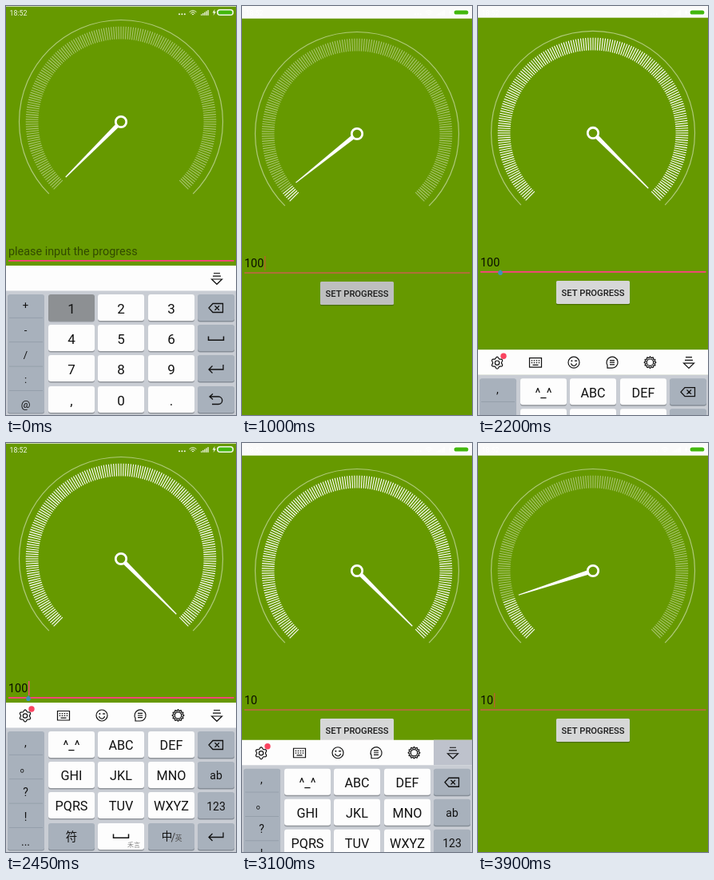
Animation of 288 by 512 pixels, one loop 4100 ms. Source, as an HTML page with a canvas:

```html
<!DOCTYPE html>
<html lang="en">
<head>
<meta charset="utf-8">
<title>Gauge</title>
<style>
html, body { margin: 0; width: 100%; height: 100%; overflow: hidden; background: #690; }
canvas { display: block; width: 288px; height: 512px; }
</style>
</head>
<body>
<canvas id="stage"></canvas>
<script>
const W = 288, H = 512, LOOP = 4100, STEP = 50, PAN = 15, KEYS_H = 187;
const TAU = Math.PI * 2;
const SANS = 'Roboto, "Noto Sans CJK SC", "Noto Sans CJK", sans-serif';
const COLS = [53, 115, 178], ROWS = [361, 399, 437, 476];
const INK = '#111';

const canvas = document.getElementById('stage');
const dpr = window.devicePixelRatio || 1;
canvas.width = W * dpr;
canvas.height = H * dpr;
const c = canvas.getContext('2d');

const clamp = v => Math.max(0, Math.min(1, v));
const ramp = (t, start, dur) => clamp((t - start) / dur);
const easeIn = u => u * u;
const easeOut = u => 1 - (1 - u) * (1 - u);
const easeBoth = u => (1 - Math.cos(Math.PI * u)) / 2;
const within = (t, a, b) => t >= a && t < b;

function rect(x, y, w, h, color) {
  c.fillStyle = color;
  c.fillRect(x, y, w, h);
}

function round(x, y, w, h, r, color) {
  c.fillStyle = color;
  c.beginPath();
  c.roundRect(x, y, w, h, r);
  c.fill();
}

function disc(x, y, r, color) {
  c.fillStyle = color;
  c.beginPath();
  c.arc(x, y, r, 0, TAU);
  c.fill();
}

function ring(x, y, r, width, color, from = 0, to = TAU) {
  c.strokeStyle = color;
  c.lineWidth = width;
  c.beginPath();
  c.arc(x, y, r, from, to);
  c.stroke();
}

function trace(d, x, y, width = 1.3, color = INK) {
  c.save();
  c.translate(x, y);
  c.strokeStyle = color;
  c.lineWidth = width;
  c.stroke(new Path2D(d));
  c.restore();
}

function write(s, x, base, size, color, align = 'left', weight = 400) {
  c.font = `${weight} ${size}px ${SANS}`;
  c.textAlign = align;
  c.fillStyle = color;
  c.fillText(s, x, base);
}

const label = (s, x, y, size, color = INK) =>
  write(s, x, y + size * 0.36, size, color, 'center');

// ---- time-dependent state ----

function panAt(t) {
  if (t < 1000) return -PAN * (1 - easeOut(ramp(t, 400, 200)));
  if (t < 2800) return -PAN * easeOut(ramp(t, 2193, 200));
  return -PAN * (1 - easeOut(ramp(t, 2890, 200)));
}

function keysOffset(t) {
  if (t < 1000) return KEYS_H * easeIn(ramp(t, 550, 200));
  if (t < 2800) return KEYS_H * (1 - easeOut(ramp(t, 2150, 200)));
  return KEYS_H * easeIn(ramp(t, 3000, 200));
}

const progressAt = t =>
  easeBoth(ramp(t, 941, 600)) - 0.9 * easeBoth(ramp(t, 3279, 600));

function textAt(t) {
  if (t < 100) return '';
  if (t < 200) return '1';
  if (t < 300) return '10';
  return t < 2650 ? '100' : '10';
}

const cursorAt = t => within(t, 100, 1200) || within(t, 1700, 2200) ||
  within(t, 2350, 2750) || t >= 3700;

function pressedKey(t) {
  if (t < 100) return '1';
  if (within(t, 150, 200) || within(t, 250, 300)) return '0';
  if (within(t, 2550, 2650)) return 'back';
  return '';
}

// ---- gauge and form ----

function drawGauge(p) {
  const x = 144, y = 160, start = Math.PI * 0.75, sweep = Math.PI * 1.5, n = 180;
  ring(x, y, 127.5, 1.2, 'rgba(255,255,255,.48)', start, start + sweep);
  c.save();
  c.translate(x, y);
  for (let i = 0; i <= n; i++) {
    c.save();
    c.rotate(start + sweep * i / n);
    const lit = p > 0 && i / n <= p;
    rect(103.5, -0.55, 15.8, 1.1, lit ? '#fff' : 'rgba(255,255,255,.43)');
    c.restore();
  }
  c.rotate(start + sweep * p);
  c.fillStyle = '#fff';
  c.beginPath();
  c.moveTo(7, -2.7);
  c.lineTo(98, -0.6);
  c.lineTo(98, 0.6);
  c.lineTo(7, 2.7);
  c.fill();
  c.restore();
  ring(x, y, 6.7, 2.8, '#fff');
}

function drawForm(t, pan) {
  const s = textAt(t), pink = pan < 0;
  write(s || 'please input the progress', 3, 327, 14.4, s ? '#0a0f00' : 'rgba(0,0,0,.52)');
  const end = 4.3 + c.measureText(s).width;
  if (s && cursorAt(t)) rect(end - 0.5, 313, 1.4, 18, pink ? '#ff4081' : '#b8602c');
  if (pink) rect(3, 333, 282.5, 1.8, '#ff4081');
  else rect(3, 333.3, 282.5, 1.5, '#c9624a');
  if (within(t, 2200, 2550)) {
    disc(28, 335.2, 2.8, '#3c93b8');
    c.beginPath();
    c.moveTo(28, 331);
    c.lineTo(30.5, 334);
    c.lineTo(25.5, 334);
    c.fill();
  }

  const since = t - (t < 2000 ? 900 : 3250);
  const dark = since >= 0 ? 0.14 * (1 - ramp(since, 0, 500)) : 0;
  round(98, 346, 92, 29.3, 1.6, 'rgba(0,0,0,.28)');
  round(98, 345, 92, 29, 1.6, '#d6d7d7');
  if (dark) round(98, 345, 92, 29, 1.6, `rgba(0,0,0,${dark})`);
  write('SET PROGRESS', 144, 363.6, 11.2, '#1c1c1c', 'center', 500);
}

function drawStatus() {
  const white = 'rgba(255,255,255,.92)';
  write('18:52', 4.5, 11.6, 8.8, white);
  for (let i = 0; i < 3; i++) disc(217 + i * 3.4, 10.3, 1, white);
  for (let i = 0; i < 3; i++) {
    ring(234, 12, 1.6 + i * 2.3, 1, white, Math.PI * 1.25, Math.PI * 1.75);
  }
  for (let i = 0; i < 5; i++) rect(244 + i * 2.1, 10.3 - i * 1.3, 1.3, 1.5 + i * 1.3, white);
  c.fillStyle = white;
  c.fill(new Path2D('M261.5 4L258.5 8.6H260.5L259.5 12L263 7.3H261Z'));
  round(264, 4, 21, 8, 4, white);
  round(265.6, 5.4, 17.8, 5.2, 2.6, '#43b80e');
}

// ---- keyboard ----

function key(x, y, w, tone, down) {
  const face = { light: '#fdfdfd', dark: '#a8b1bc' }[tone];
  round(x, y + 1, w, 33.5, 3, tone === 'light' ? '#92969c' : '#858d97');
  round(x, y, w, 33, 3, down ? '#8d9093' : face);
}

const backspace = (x, y) =>
  trace('M-9 0L-4 -5.5H8.5V5.5H-4ZM-1.5 -2.7L4 2.7M4 -2.7L-1.5 2.7', x, y);
const space = (x, y) => trace('M-9.5 -3V1.7H9.5V-3', x, y, 1.5);
const enter = (x, y) => trace('M9 -5V1H-9M-4.5 -3.5L-9 1L-4.5 5.5', x, y);
const undo = (x, y) =>
  trace('M-4 -7.5L-8 -4L-4 -0.5M-8 -4H3A4.7 4.7 0 0 1 3 5.5H-5', x, y);

function gear(x, y, teeth, r, bump, hole) {
  c.strokeStyle = INK;
  c.lineWidth = 1.2;
  c.beginPath();
  for (let i = 0; i <= 96; i++) {
    const a = TAU * i / 96, d = r + bump * Math.cos(a * teeth);
    c.lineTo(x + d * Math.sin(a), y + d * Math.cos(a));
  }
  c.stroke();
  ring(x, y, hole, 1.2, INK);
}

function drawToolbar(full, held) {
  rect(0, 325, W, 31.5, '#fdfdfd');
  if (held) rect(240, 325, 48, 31.5, '#bec2cc');
  trace('M-4 -7H4M-5 -3.3H5M-6.5 0.5H6.5L0 6.8Z', 264, 341.5, 1.2);
  if (!full) return;
  gear(24, 341.5, 6, 6.4, 1, 2.7);
  disc(32, 333, 3.7, '#fa4460');
  trace('M-7.5 -5.5H7.5V6H-7.5ZM-3.5 3.2H3.5', 72, 341, 1.2);
  for (let i = 0; i < 8; i++) rect(66.7 + (i % 4) * 3, 338 + (i >> 2) * 2.7, 1.5, 1.3, INK);
  ring(120, 341, 7, 1.2, INK);
  ring(120, 341.5, 3.6, 1.2, INK, 0.2, Math.PI - 0.2);
  disc(117.4, 339, 1, INK);
  trace('M1 -1.5H4.2', 120, 340.5);
  trace('M-6 7H0A7 7 0 1 0 -6 3.5ZM-3 -2.6H3M-3 0H3M-3 2.6H3', 168, 341, 1.2);
  gear(215.5, 341, 12, 6.5, 0.8, 4.2);
}

function drawSide(marks, sizes) {
  round(2, 362, 46, 148.5, 3, '#858d97');
  round(2, 361, 46, 148.5, 3, '#a8b1bc');
  for (let i = 1; i < 5; i++) rect(4, 359.5 + i * 30.4, 42, 0.8, '#919ba7');
  marks.forEach((m, i) => label(m, 24.5, 374.5 + i * 31, sizes));
}

function drawNumbers(down) {
  drawSide(['+', '-', '/', ':', '@'], 13);
  const names = '123456789,0.';
  [...names].forEach((n, i) => {
    const x = COLS[i % 3], y = ROWS[Math.floor(i / 3)];
    key(x, y, 58, 'light', down === n);
    label(n, x + 29, y + 17.5, 17);
  });
  ROWS.forEach(y => key(240, y, 46, 'dark'));
  backspace(263, 378);
  space(263, 416.5);
  enter(263, 454);
  undo(263, 493);
}

function drawLetters(down) {
  drawSide([',', '。', '?', '!', '...'], 14);
  const names = ['^_^', 'ABC', 'DEF', 'GHI', 'JKL', 'MNO', 'PQRS', 'TUV', 'WXYZ'];
  names.forEach((n, i) => {
    const x = COLS[i % 3], y = ROWS[Math.floor(i / 3)];
    key(x, y, 58, 'light');
    label(n, x + 29, y + 17.5, 16.2);
  });
  COLS.forEach((x, i) => key(x, ROWS[3], 58, i === 1 ? 'light' : 'dark'));
  label('符', 82, 493, 14.5);
  space(144, 492.5);
  label('禾言', 160, 503, 8, '#888');
  label('中', 201.5, 492.5, 13.5);
  label('/', 209.5, 494, 14, '#444');
  label('英', 216, 495, 9, '#555');
  ROWS.forEach((y, i) => key(240, y, 46, 'dark', i === 0 && down === 'back'));
  backspace(263, 378);
  label('ab', 263, 416, 14);
  label('123', 263, 454.5, 14);
  enter(263, 492.5);
}

function drawKeyboard(t) {
  const off = keysOffset(t);
  if (off >= KEYS_H) return;
  const letters = t > 1500;
  const held = letters ? t >= 2900 : t >= 400;
  c.save();
  c.translate(0, off);
  rect(0, 356, W, 156, '#c9cdd4');
  drawToolbar(letters, held);
  (letters ? drawLetters : drawNumbers)(pressedKey(t));
  c.restore();
}

function draw(t) {
  const pan = panAt(t);
  c.setTransform(dpr, 0, 0, dpr, 0, 0);
  rect(0, 0, W, H, '#fafafa');
  c.save();
  c.translate(0, pan);
  rect(0, 15.7, W, H + PAN, '#669900');
  drawGauge(progressAt(t));
  drawForm(t, pan);
  c.restore();
  drawStatus();
  drawKeyboard(t);
}

const begin = performance.now();
function tick() {
  const t = (performance.now() - begin) % LOOP;
  draw(Math.min(3900, Math.floor(t / STEP) * STEP));
  requestAnimationFrame(tick);
}
tick();
</script>
</body>
</html>
```
